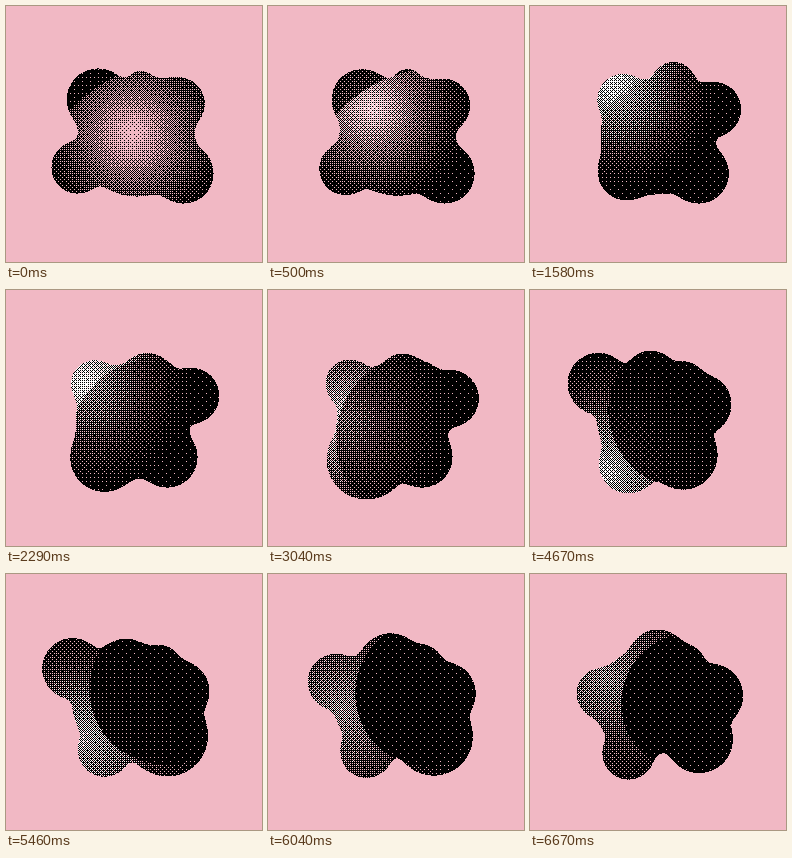
An HTML page with a canvas that plays this animation: 256x256 px, repeating every 6.71 s.

```html
<!DOCTYPE html>
<html lang="en">
<head>
<meta charset="utf-8">
<title>Drifting blob</title>
<style>
  html, body { margin: 0; height: 100%; overflow: hidden; background: #f1b8c4; }
  canvas { display: block; width: 256px; height: 256px; image-rendering: pixelated; }
</style>
</head>
<body>
<canvas id="stage" width="256" height="256"></canvas>
<script>
const SIZE = 256, LOOP = 6710, STEP = 41.7, LAST_STEP = 160;
const PINK = 0xffc4b8f1, WHITE = 0xffffffff, BLACK = 0xff000000;
const MELT = 4;      // softness of the joints between balls
const AMBIENT = .03;

// All times below are in seconds
const wave = (t, middle, swing, period, peak) =>
  middle + swing * Math.cos(2 * Math.PI * (t - peak) / period);
const pulse = (t, peak, width) => Math.exp(-((t - peak) ** 2) / width);
const ease = (t, from, to) => {
  const u = Math.min(1, Math.max(0, (t - from) / (to - from)));
  return u * u * (3 - 2 * u);
};

// Each ball drifts on its own path: [x, y, radius]
const balls = [
  function core(t) {
    return [130 - 2 * t, 132 - .7 * t, 58 - .9 * t];
  },
  function upperRight(t) {
    return [wave(t, 178, 7, 5.4, 2.2), 97 + 3.6 * t, 26 + .8 * t];
  },
  function upperLeft(t) {
    return [wave(t, 80, 14, 9, .9), 93 + 26 * ease(t, 5.3, 6.7), wave(t, 27, 4, 5, 0)];
  },
  function top(t) {
    const r = 15 + 2.2 * t + wave(t, 0, 3.5, 3.6, 2);
    return [wave(t, 131, 12, 7.4, 1.5), r + wave(t, 60, -5, 2.6, 1.4), r];
  },
  function shoulder(t) {
    return [153, 92, 18 + .6 * t];
  },
  function lowerLeft(t) {
    return [98 - 27 * pulse(t, 0, 1), 161 + 2.7 * t, 26 + 14 * pulse(t, 3.2, 1.5)];
  },
  function lowerRight(t) {
    const swell = pulse(t, 5.6, 1);
    return [wave(t, 163, 14, 8.4, 0) + 6 * swell, 167 - 6 * swell, 30 + 11 * swell];
  }
];

// The light circles from the front round to the far left
const lightAt = t => ({
  x: 75 + 51 * Math.exp(-t / .9),
  y: wave(t, 130, -52, 6.2, 1.5),
  power: .95 - .075 * t,
  reach: 102 + 5 * t
});

// The near side of the body, which hides the light as it moves behind
function frontAt(t) {
  const early = pulse(t, 0, 1.5);
  return {
    x: 146 + 2.2 * t + 34 * early,
    y: wave(t, 135, 20, 6.4, 2.2) + 86 * early,
    r: 98 - 4.2 * t + 59 * early,
    inner: Math.max(0, 1 - t / 6),
    outer: 1 - .9 * early
  };
}

// 8 x 8 ordered threshold, rows counted from the bottom
function threshold(x, y) {
  const row = SIZE - 1 - y;
  let v = 0;
  for (let bit = 0; bit < 3; bit++) {
    const a = x >> bit & 1, b = row >> bit & 1;
    v = v * 4 + (a ^ b) * 2 + b;
  }
  return (v + .5) / 64;
}

const ctx = document.getElementById("stage").getContext("2d");
const image = ctx.createImageData(SIZE, SIZE);
const pixels = new Uint32Array(image.data.buffer);

function draw(t) {
  const blob = balls.map(ball => ball(t));
  const light = lightAt(t), front = frontAt(t);
  const rim = Math.min(1, Math.hypot(light.x - 128, light.y - 128) / 65);

  const isInside = (x, y) => {
    let sum = 0;
    for (const [bx, by, r] of blob) sum += Math.exp((r - Math.hypot(x - bx, y - by)) / MELT);
    return sum > 1;
  };

  pixels.fill(PINK);
  for (let y = 45; y < 220; y++) {
    for (let x = 25; x < 230; x++) {
      if (!isInside(x, y)) continue;
      const gain = Math.hypot(x - front.x, y - front.y) < front.r ? front.inner : front.outer;
      const near = Math.max(0, 1 - Math.hypot(x - light.x, y - light.y) / light.reach);
      const shade = AMBIENT + light.power * gain * near ** 1.4;
      const level = threshold(x, y);
      // Light that grazes the rim is whiter than light from the front
      const white = (shade * rim - .2) * 1.5;
      pixels[y * SIZE + x] = shade < level ? BLACK : white > level ? WHITE : PINK;
    }
  }
  ctx.putImageData(image, 0, 0);
}

const start = performance.now();
let shown = -1;
function tick() {
  const t = (performance.now() - start) % LOOP;
  const step = Math.min(LAST_STEP, Math.floor((t + 6) / STEP));
  if (step !== shown) draw((shown = step) * STEP / 1000);
  requestAnimationFrame(tick);
}
tick();
</script>
</body>
</html>
```
